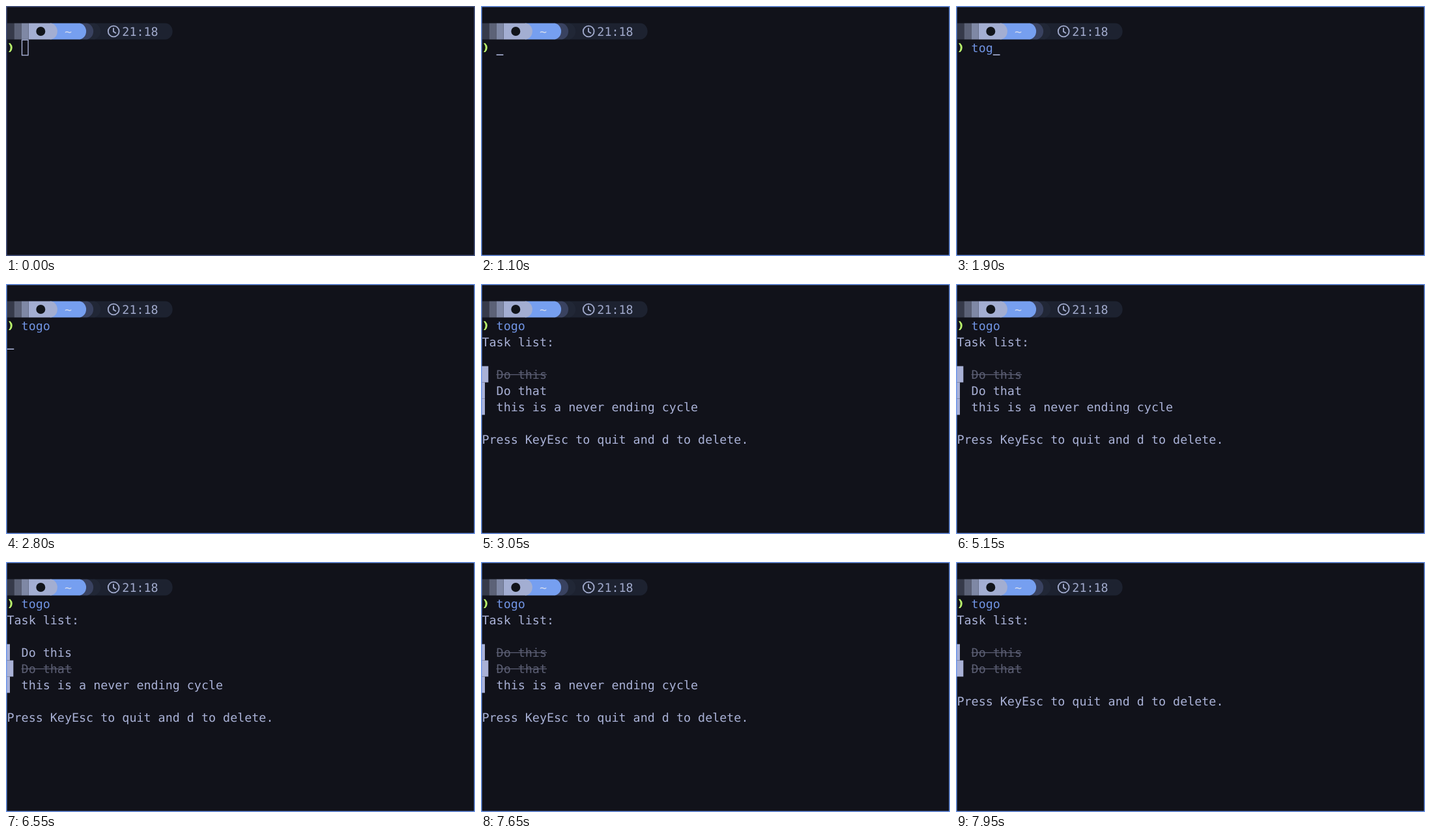
Write an HTML page that moves like this. It is 720 px wide and 385 px high and loops after 8000 ms.

```html
<!DOCTYPE html>
<html lang="en">
<head>
<meta charset="utf-8">
<title>Terminal task list</title>
<style>
  html, body { margin: 0; width: 100%; height: 100%; overflow: hidden; background: #11121a; }
  svg { display: block; width: 720px; height: 385px; }
  text {
    font: 18.36px "DejaVu Sans Mono", monospace;
    fill: #a9b1d6;
    white-space: pre;
    text-rendering: geometricPrecision;
  }
</style>
</head>
<body>
<svg id="stage" viewBox="0 0 720 385">
  <rect width="720" height="385" fill="#11121a"/>
  <g id="prompt"></g>
  <g id="screen"></g>
  <rect id="border" x=".75" y=".75" width="718.5" height="383.5" fill="none" stroke-width="1.5"/>
</svg>
<script>
const LOOP = 8000;
const CELL = 11.053, LINE = 25, ORIGIN = 1.5;
const FG = '#a9b1d6', DIM = '#5b5e73', BLUE = '#7093e2';

const colX = c => ORIGIN + c * CELL;
const rowY = r => ORIGIN + r * LINE;

const rect = (x, y, w, h, fill) =>
  `<rect x="${x}" y="${y}" width="${w}" height="${h}" fill="${fill}"/>`;
const text = (col, row, str, fill = FG) =>
  `<text x="${colX(col)}" y="${21 + row * LINE}" style="fill:${fill}">${str}</text>`;

// A prompt segment: flat cells, then a rounded end one cell wide
const segment = (from, to, fill) => {
  const x = colX(to), y = rowY(1);
  return `<path fill="${fill}" d="M${colX(from)} ${y}H${x}A${CELL} ${LINE / 2} 0 0 1 ${x} ${y + LINE}H${colX(from)}Z"/>`;
};

function drawPrompt() {
  const shades = ['#363a4a', '#5c6277', '#7f88a5'];
  return segment(12, 22, '#1d2230')
    + segment(11, 12, '#212736')
    + segment(10, 11, '#394260')
    + segment(6, 10, '#769ff0')
    + segment(3, 6, '#a3aed2')
    + shades.map((c, i) => rect(colX(i), rowY(1), CELL, LINE, c)).join('')
    + '<circle cx="53.3" cy="39" r="7" fill="#11141a"/>'
    + text(8, 1, '~', '#d5dcee')
    + '<g fill="none" stroke="#a0a9cb" stroke-width="1.9"><circle cx="165.2" cy="39" r="8.4"/><path d="M165 33.8V39.4L169 42"/></g>'
    + text(16, 1, '21:18', '#a0a9cb')
    + '<path fill="#b9f26c" d="M4 57.3H6.6Q9.8 60.5 9.8 64.2T6.6 71H4Q6.8 67.5 6.8 64.2T4 57.3Z"/>';
}

// Each step changes part of the screen state from its time on
const steps = [
  [0, { focus: false, cursor: [2, 2], typed: '', tasks: 0, pick: 0, done: [1, 0, 0] }],
  [1100, { focus: true }],
  [1600, { typed: 't', cursor: [3, 2] }],
  [1700, { typed: 'to', cursor: [4, 2] }],
  [1850, { typed: 'tog', cursor: [5, 2] }],
  [2000, { typed: 'togo', cursor: null }],
  [2300, { cursor: [0, 3] }],
  [2850, { tasks: 3, cursor: [0, 10] }],
  [3050, { cursor: null }],
  [4150, { pick: 1 }],
  [4550, { pick: 2 }],
  [4950, { pick: 1 }],
  [5150, { pick: 0 }],
  [5650, { done: [0, 0, 0] }],
  [6100, { pick: 1 }],
  [6400, { done: [0, 1, 0] }],
  [6900, { pick: 0 }],
  [7050, { done: [1, 1, 0] }],
  [7650, { pick: 1 }],
  [7800, { pick: 2 }],
  [7950, { tasks: 2, pick: 1 }]
];

const labels = ['Do this', 'Do that', 'this is a never ending cycle'];

function drawTask(label, i, s) {
  const row = 5 + i, done = s.done[i];
  let out = rect(1, rowY(row), s.pick === i ? 10.3 : 5, LINE, FG)
    + text(2, row, label, done ? DIM : FG);
  if (done) out += rect(colX(2), 13.9 + row * LINE, label.length * CELL, 1.3, DIM);
  return out;
}

function drawCursor([col, row], solid) {
  const x = colX(col), y = rowY(row);
  return solid
    ? rect(x, y + 23, CELL - .3, 1.5, '#b4bde4')
    : `<rect x="${x + .9}" y="${y + .8}" width="9.5" height="23.5" fill="none" stroke="#b4bde4" stroke-width="1.3"/>`;
}

function drawScreen(s) {
  let out = text(2, 2, s.typed, BLUE);
  if (s.tasks) {
    out += text(0, 3, 'Task list:')
      + labels.slice(0, s.tasks).map((l, i) => drawTask(l, i, s)).join('')
      + text(0, 6 + s.tasks, 'Press KeyEsc to quit and d to delete.');
  }
  if (s.cursor) out += drawCursor(s.cursor, s.focus);
  return out;
}

const $ = id => document.getElementById(id);
$('prompt').innerHTML = drawPrompt();

const start = performance.now();
let shown = -1;

function tick() {
  const t = (performance.now() - start) % LOOP;
  const past = steps.filter(([at]) => at <= t);
  if (past.length !== shown) {
    shown = past.length;
    const state = Object.assign({}, ...past.map(([, change]) => change));
    $('screen').innerHTML = drawScreen(state);
    $('border').setAttribute('stroke', state.focus ? '#7199ec' : '#4c5a86');
  }
  requestAnimationFrame(tick);
}
tick();
</script>
</body>
</html>
```
